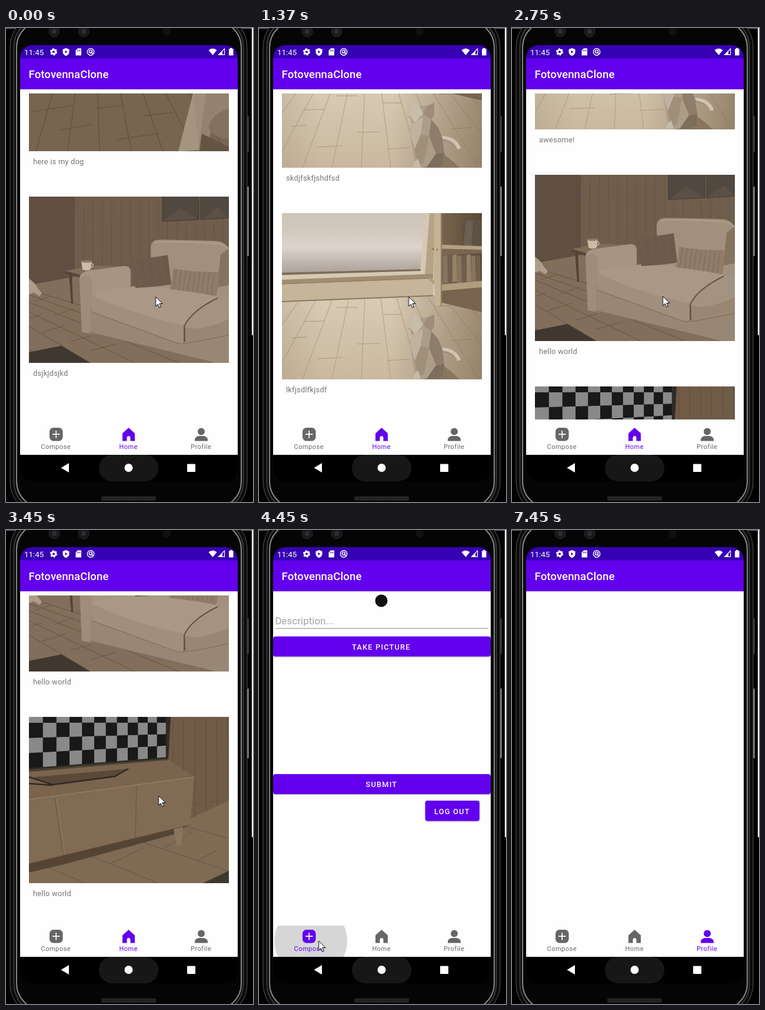
Animation, 420 px wide and 804 px high, one loop 7620 ms. Source, as an HTML page:

```html
<!DOCTYPE html>
<html lang="en">
<head>
<meta charset="utf-8">
<title>Photo feed on a phone</title>
<style>
html, body { margin: 0; width: 100%; height: 100%; overflow: hidden; background: #000; }
body > svg { display: block; width: 420px; height: 804px; }
text { font-family: Roboto, sans-serif; }
.line { fill: none; }
.caption { font-size: 12.8px; letter-spacing: .25px; fill: #757575; }
.title { font-size: 18.6px; font-weight: 500; letter-spacing: .1px; fill: #fff; }
.button { font-size: 12.8px; font-weight: 500; letter-spacing: 1.2px; fill: #fff; }
.label { font-size: 11px; letter-spacing: .5px; }
.tab { color: #666; fill: currentColor; }

#feed, #compose, .tab, .late, .ripple, #cursor { animation: 7620ms step-end infinite; }
#feed { animation-name: feed; }
#compose { animation-name: compose; }
.late { animation-name: late; }
#tabCompose { animation-name: tab-compose; }
#tabHome { animation-name: tab-home; }
#tabProfile { animation-name: tab-profile; }
#rippleA { animation-name: ripple-a; }
#rippleB { animation-name: ripple-b; }
#cursor { animation-name: cursor; }
#list { animation: scroll 7620ms linear infinite; }
.ripple { transform-box: fill-box; transform-origin: center; }

@keyframes feed { 0% { visibility: visible } 58.39%, 100% { visibility: hidden } }
@keyframes compose { 0% { visibility: hidden } 58.39% { visibility: visible } 73.35%, 100% { visibility: hidden } }
@keyframes late { 0% { opacity: 0 } 1.7%, 100% { opacity: 1 } }
@keyframes tab-home { 0% { color: #6200ee } 58.39%, 100% { color: #666 } }
@keyframes tab-compose { 0% { color: #666 } 58.39% { color: #6200ee } 73.35%, 100% { color: #666 } }
@keyframes tab-profile { 0% { color: #666 } 73.35%, 100% { color: #6200ee } }
@keyframes scroll {
  0% { transform: translateY(0) }
  1.7% { transform: translateY(0); animation-timing-function: steps(3, start) }
  7.08% { transform: translateY(-259px) }
  8.92% { transform: translateY(-259px); animation-timing-function: steps(3, start) }
  14.3% { transform: translateY(-518px) }
  16.14% { transform: translateY(-518px); animation-timing-function: steps(2, start) }
  19.75% { transform: translateY(-690px); animation-timing-function: steps(4, start) }
  26.98% { transform: translateY(-989px); animation-timing-function: steps(6, start) }
  37.74% { transform: translateY(-1473px); animation-timing-function: steps(5, start) }
  47.11%, 100% { transform: translateY(-1764px) }
}
@keyframes ripple-a {
  0% { opacity: 0; transform: scale(.45) }
  56.56% { opacity: .1; transform: scale(.6) }
  58.39% { opacity: .16; transform: none }
  60.36% { opacity: .13; transform: scale(1.05) }
  62.2% { opacity: .08; transform: scale(1.08) }
  64.04% { opacity: .03; transform: scale(1.08) }
  66%, 100% { opacity: 0; transform: none }
}
@keyframes ripple-b {
  0% { opacity: 0; transform: scale(.45) }
  71.52% { opacity: .1; transform: scale(.6) }
  73.35% { opacity: .16; transform: none }
  75.19% { opacity: .13; transform: scale(1.05) }
  77.16% { opacity: .06; transform: scale(1.08) }
  79%, 100% { opacity: 0; transform: none }
}
@keyframes cursor {
  0% { transform: translate(254.5px, 456px) }
  19.8% { transform: translate(256.5px, 455px) }
  45.24% { transform: translate(259.5px, 451px) }
  47.2% { transform: translate(246px, 482px) }
  49% { transform: translate(205px, 561px) }
  50.9% { transform: translate(151px, 640px) }
  52.7% { transform: translate(113px, 687px) }
  54.7% { transform: translate(101.5px, 697px) }
  62.2% { transform: translate(157px, 696px) }
  64.04% { transform: translate(268px, 691px) }
  66% { transform: translate(366px, 695px) }
  67.84% { transform: translate(349.5px, 698px) }
  92.12% { transform: translate(357px, 742px) }
  94.09% { transform: translate(372.5px, 802.5px) }
  97.76%, 100% { transform: translate(380px, 830px) }
}
</style>
</head>
<body>
<svg viewBox="0 0 420 804">
  <defs>
    <linearGradient id="glass" x2="0" y2="1">
      <stop stop-color="#cdc3b7"/><stop offset=".3" stop-color="#d2c8be"/>
      <stop offset=".55" stop-color="#ddd4cc"/><stop offset="1" stop-color="#a99e96"/>
    </linearGradient>
    <linearGradient id="pale" x2="0" y2="1">
      <stop offset=".5" stop-color="#d9ccb5"/><stop offset="1" stop-color="#c8b89f"/>
    </linearGradient>
    <linearGradient id="shade">
      <stop stop-color="#6b563e" stop-opacity=".12"/><stop offset=".2" stop-color="#6b563e" stop-opacity="0"/>
      <stop offset=".55" stop-color="#6b563e" stop-opacity="0"/><stop offset="1" stop-color="#6b563e" stop-opacity=".55"/>
    </linearGradient>
    <linearGradient id="shelf">
      <stop stop-color="#7b6750"/><stop offset="1" stop-color="#5a4836"/>
    </linearGradient>
    <linearGradient id="brown" x2="1" y2="0">
      <stop stop-color="#5f4e40"/><stop offset="1" stop-color="#776552"/>
    </linearGradient>
    <pattern id="mesh" width="3" height="3" patternUnits="userSpaceOnUse">
      <path d="M0 0h3v3H0z" fill="#1b1b1b"/><circle cx="1.5" cy="1.5" r=".8" fill="#454545"/>
    </pattern>
    <clipPath id="screen"><rect x="24" y="29" width="370" height="740" rx="21"/></clipPath>
    <clipPath id="feedBox"><path d="M24 111.500H394V664H24z"/></clipPath>
    <clipPath id="tabs"><path d="M24 671H394V724H24z"/></clipPath>

    <symbol id="floor" viewBox="0 0 340 282">
      <path d="M0 0h340v282H0z" fill="#77654f"/>
      <g id="floorPlanks" class="line" stroke="#5d4c3b"/>
      <path d="M0 216l75-12M52 246l58-10M112 210l50-6M150 262l70-10M196 222l48-6" class="line" stroke="#5f4f3e"/>
      <path d="M254 282l25-98 32-2-10 97-40 3z" fill="#a59480"/>
      <path d="M279 170h70v55l-40 16-22 25z" fill="#a08e7a"/>
      <path d="M303 170l-15 108 11 4 14-44 27-20V170z" fill="#94826e"/>
      <path d="M305 240c8-18 16-24 35-30v52c-20-2-28-8-35-22z" fill="#83715f"/>
      <path d="M294 252l46 23v7h-50z" fill="#655442"/>
    </symbol>

    <symbol id="sofa" viewBox="0 0 340 282">
      <path d="M0 0h340v282H0z" fill="url(#brown)"/>
      <path d="M78 0h262v160H78z" fill="#705e4c"/>
      <g id="sofaPanels" class="line" stroke="#5d4c3d" opacity=".55"/>
      <path d="M0 0h78v152l-78-10z" fill="#604f41"/>
      <path d="M0 150l88-16v60l252 88H0z" fill="#826f5b"/>
      <g id="sofaPlanks" class="line" stroke="#66543f"/>
      <path d="M10 178l26-8M44 202l32-12M18 232l44-14M70 246l36-10M104 262l44-12M2 206l18-6" class="line" stroke="#695743"/>
      <path d="M62 126l48-9 64 2-78 16z" fill="#806c57"/><path d="M62 126v5l34 9v-5z" fill="#584738"/>
      <path d="M68 130l4 52 3-1-2-50z" fill="#514236"/>
      <path d="M0 139c7 5 12 10 14 15l8 10-4 5-10-6-8 3z" fill="#ad9c87"/>
      <path d="M0 264l55-11 49 29H0z" fill="#40372f"/>
      <path d="M227 0h62v39l-62 3zM292 0h48v36l-48 3z" fill="#514840"/>
      <path d="M227 42l31-22 31 19zM292 39l29-21 19 18z" fill="#5c5046"/>
      <path d="M227 0v42l62-3V0M292 0v39l48-3" class="line" stroke="#423930"/>
      <path d="M89 109h18l-2 14c-3 3-11 3-14 0z" fill="#cbbba7"/><ellipse cx="98" cy="110" rx="9" ry="2" fill="#8d7a67"/>
      <path d="M105 114c6-2 5 6-1 6" class="line" stroke="#cbbba7" stroke-width="1.500"/>
      <path d="M207 88c0-12 7-15 18-15l88 2c13 0 24 4 27 15v86H209z" fill="#a1907d"/>
      <path d="M214 78c22-3 76-1 108 2 10 2 14 5 18 9" class="line" stroke="#b09f8b" stroke-width="2"/>
      <path d="M326 98l14-10v62l-20 4z" fill="#85735f"/>
      <path d="M86 137c2-8 10-11 19-12l55-7c10-1 13 4 13 10v24l-65 22v57l-18-3z" fill="#a69583"/>
      <path d="M86 138c8-7 18-5 21 3l1 92-18-3z" fill="#9f8d7a"/>
      <path d="M104 188l158 58 78-12v48H316L104 231z" fill="#998775"/>
      <path d="M108 166c2-7 14-9 74-14l116 5c18 1 24 8 24 15l-56 47-3 26c-1 5-8 5-16 2L108 196z" fill="#a08f7c"/>
      <path d="M108 168c2-8 14-11 74-16l116 5c18 1 26 8 22 15l-57 46c-40-8-105-26-155-50z" fill="#a99886"/>
      <path d="M266 219c4-12 24-30 54-46l20-5v70l-56 13c-11 1-18-4-18-12z" fill="#a49380"/>
      <path d="M266 221c14 5 34 4 74-13v30l-56 13c-11 1-18-4-18-12z" fill="#998774"/>
      <path d="M264 247v-27c8-17 26-33 57-48" class="line" stroke="#665542" stroke-width="2"/>
      <path d="M103 230l213 52M108 196l140 51c10 4 24 2 92-12" class="line" stroke="#7b6955"/>
      <path d="M172 106c22-1 42-3 64-7 2 16 4 33 6 50-20 3-42 5-61 6-3-17-5-33-9-49z" fill="#6c5b4b"/>
      <path d="M180 110l10 40m6-42l8 42m8-44l6 42m4-44l8 42" class="line" stroke="#746352"/>
      <path d="M245 122c26 5 52 6 79 6-2 14-3 27-5 41-27-5-53-9-80-12 4-12 5-23 6-35z" fill="#8f7d69"/>
      <g id="cushion" class="line" stroke="#7d6b58"/>
    </symbol>

    <symbol id="cat" viewBox="0 0 340 282">
      <path d="M0 0h340v282H0z" fill="url(#pale)"/>
      <g id="catPlanks" class="line" stroke="#b09e84"/>
      <path d="M38 184l34-1M92 160h37M128 222l39-1M60 247l42-2M171 172h33M178 250l40-2M16 212l26-2M213 196h20M288 216l34-2M258 158l28-1" class="line" stroke="#ad9b81"/>
      <path d="M0 140h340v142H0z" fill="url(#shade)"/>
      <path d="M0 0h248l-11 98-237 6z" fill="url(#glass)"/>
      <path d="M244 0h17l-4 112-257 11v-16l235-9z" fill="#d6c9b2"/>
      <path d="M251 0h10l-4 106h-14z" fill="#b6a387"/>
      <path d="M0 101l236-6v3L0 105z" fill="#7c6d5b"/>
      <path d="M0 113l257-10v9L0 121z" fill="#a08d72"/>
      <path d="M0 121l257-10v30L0 149z" fill="#c5b59a"/>
      <path d="M0 120l257-10" class="line" stroke="#8f7c62"/><path d="M0 150l257-10" class="line" stroke="#897860" stroke-width="2"/>
      <path d="M266 0h74v140l-70 2z" fill="url(#shelf)"/>
      <path d="M306 18l7-5 27-3v48l-32 2z" fill="#5d5143"/><path d="M313 13l12-1-3 47-14 1z" fill="#6c6052"/>
      <g id="books"/>
      <path d="M252 53l88 3v8l-72 3-16-13z" fill="#b3a184"/><path d="M254 60l86 2v6l-71 3z" fill="#7a6650"/>
      <path d="M250 108l20 13 70-6v11l-70 6-20-19z" fill="#b09d7f"/>
      <path d="M259 0h13l-1 157-10 1-3-52z" fill="#c3b294"/><path d="M271 0v157" class="line" stroke="#917e64" stroke-width="2"/>
      <path d="M272 132l68-6v42l-68-16z" fill="#78644e"/>
      <circle cx="264" cy="62" r="1.500" fill="#867459"/>
      <path d="M264 250l30 24 8 8h-62z" fill="#89765f"/>
      <path d="M266 231c13 0 22 2 27 7 4 3 7 7 8 12" class="line" stroke="#cfc3b1" stroke-width="6"/>
      <path d="M266 234c11 0 20 2 26 9" class="line" stroke="#9a8a77" stroke-width="2"/>
      <path d="M223 168l11 9h13l12-5v20l-5 8 12 14 7 18 3 24-1 20-8 5h-46l5-10-4-22-4-24 3-18-4-14 3-12z" fill="#ac9d89"/>
      <path d="M220 181l3-13 11 9 6 13-14 16-9-13z" fill="#c8bcaa"/>
      <path d="M247 177l12-5v20l-5 8-14-10z" fill="#9d8d79"/>
      <path d="M221 207l19-11-4 30-10 24-8-25z" fill="#bfb2a0"/>
      <path d="M254 200l12 14 7 18 3 24-14 2-12-30z" fill="#8d7d6a"/>
      <path d="M262 258l14-2-1 20-8 5h-21z" fill="#7d6d5b"/>
      <path d="M236 226l14 2-8 44-10 8-6-30z" fill="#a09079"/>
      <path d="M221 281l5-10 6-4 4 14z" fill="#c5b9a7"/>
    </symbol>

    <symbol id="tv" viewBox="0 0 340 282">
      <path d="M0 0h340v282H0z" fill="#6e5a46"/>
      <path d="M238 0h102v180H238z" fill="#705b47"/>
      <g id="tvPanels" class="line" stroke="#624f3d"/>
      <path d="M0 236l280-66 60-28v140H0z" fill="#7f6a54"/>
      <path d="M276 150l64-10M268 186l72 20M180 208l160 54M90 230l130 52M20 250l76 32M230 222l46-26M140 248l56-26M286 244l34-18" class="line" stroke="#67543f"/>
      <path d="M0 92l237-20 44 30-10 12L0 150z" fill="#7a644e"/>
      <path d="M0 249l274-67-30 18L60 250 0 264z" fill="#544434"/>
      <path d="M246 190l16-5-2 33h-9z" fill="#8a745d"/>
      <path d="M0 140l281-38-7 81L0 249z" fill="#826b54"/>
      <path d="M0 140l281-38" class="line" stroke="#947c64" stroke-width="1.500"/>
      <path d="M0 249l274-66M44 138l14 95M183 117l-2 88" class="line" stroke="#66533f"/>
      <path d="M47 137l14 95" class="line" stroke="#917a62"/>
      <path d="M0 100l40 15 106-14 23-13L0 103z" fill="#5a4937"/>
      <path d="M0 0h241l-4 73L0 93z" fill="#302c25"/>
      <g id="checker"/>
      <path d="M0 91l237-19" class="line" stroke="#514838" stroke-width="2"/>
      <path d="M0 102l40 13 106-14 23-13M0 113l40 3" class="line" stroke="#2f2a23" stroke-width="2.500"/>
      <path d="M296 282l44-21v21z" fill="#40372e"/>
    </symbol>
  </defs>

  <!-- handset -->
  <g class="line">
    <path d="M0 .5h420" stroke="#777"/>
    <rect x="7" y="-24" width="403" height="850" rx="56" fill="#0b0b0b" stroke="#575757"/>
    <rect x="13.500" y="-18" width="390" height="838" rx="50" stroke="#3a3a3a" stroke-width="2"/>
    <rect x="18" y="-12" width="382" height="826" rx="45" fill="#050505" stroke="#858585" stroke-width="2"/>
  </g>
  <path d="M410 150h3v60h-3z" fill="#3a3a3a"/>
  <path d="M410 269h3v118h-3z" fill="#777"/>
  <path d="M418 0h2v521h-2z" fill="#fff"/>
  <g fill="#17181b" stroke="#292a2d">
    <circle cx="82" cy="6" r="9"/><circle cx="132" cy="6" r="9"/>
    <circle cx="82" cy="6" r="4" fill="#2b2d33"/><circle cx="132" cy="6" r="4" fill="#2b2d33"/>
    <circle cx="273" cy="6" r="6.500" fill="#101010" stroke="#151515"/>
  </g>
  <rect x="162" y="794" width="93" height="8" rx="3" fill="url(#mesh)"/>

  <g clip-path="url(#screen)">
    <path d="M24 29h370v740H24z" fill="#000"/>
    <path d="M24 104h370v620H24z" fill="#fefefe"/>
    <path d="M24 29h370v23H24z" fill="#3700b3"/>
    <path d="M24 51.500h370V104H24z" fill="#6200ee"/>
    <text x="31" y="45.500" font-size="13.400" fill="#fff">11:45</text>
    <text x="38.500" y="85" class="title">FotovennaClone</text>

    <g fill="#fff">
      <circle cx="81" cy="40.500" r="3.500" class="line" stroke="#fff" stroke-width="3"/>
      <circle cx="81" cy="40.500" r="5.200" class="line" stroke="#fff" stroke-width="2" stroke-dasharray="2.700 2.750"/>
      <path d="M102 34l5.500 2.300v4c0 3.500-2.500 6-5.500 7-3-1-5.500-3.500-5.500-7v-4z"/>
      <path d="M100.500 38l4 2.500-4 2.500z" fill="#3700b3"/>
      <path d="M122 34.500h6v12h-9.500V38z"/><path d="M121.500 37v2.500m2.200-2.500v2.500m2.200-2.500v2.500" stroke="#3700b3"/>
      <circle cx="144" cy="40.500" r="5.700" class="line" stroke="#fff" stroke-width="1.400"/>
      <circle cx="144" cy="40" r="2.600" class="line" stroke="#fff" stroke-width="1.400"/>
      <path d="M144 40l4 4" stroke="#fff" stroke-width="1.500"/>
      <path d="M344.500 37.500q7-5.500 14 0l-7 8.500z"/>
      <path d="M361.500 45.300h10v-10z" class="line" stroke="#fff" stroke-width="1.200"/><path d="M361 46l7-7v7z"/>
      <path d="M379 35.500h2v-1.500h3.500v1.500h2V46.500H379z"/>
    </g>

    <g id="feed" clip-path="url(#feedBox)"><g id="list"></g></g>

    <g id="compose">
      <circle cx="208" cy="120" r="10.500" fill="#111"/>
      <text x="27.500" y="160" font-size="16.800" letter-spacing=".1" fill="#a2a2a2">Description...</text>
      <path d="M28 167h362" stroke="#858585"/>
      <g fill="#999" opacity=".55"><rect x="24" y="182" width="370" height="34" rx="4"/><rect x="24" y="415.500" width="370" height="34" rx="4"/><rect x="283" y="461" width="92" height="34" rx="4"/></g>
      <g fill="#6200ee"><rect x="24" y="180.500" width="370" height="34" rx="4"/><rect x="24" y="414" width="370" height="34" rx="4"/><rect x="282.500" y="459" width="92.500" height="34.500" rx="4"/></g>
      <text x="158" y="202.500" class="button">TAKE PICTURE</text>
      <text x="181.500" y="436" class="button">SUBMIT</text>
      <text x="298" y="481.500" class="button">LOG OUT</text>
    </g>

    <g clip-path="url(#tabs)">
      <circle id="rippleA" class="ripple" cx="88" cy="697" r="62"/>
      <circle id="rippleB" class="ripple" cx="333" cy="697" r="62"/>
    </g>
    <g id="tabCompose" class="tab">
      <rect x="74" y="678" width="22.500" height="22.500" rx="6.500"/>
      <path d="M79 689.200h12.500M85.200 683v12.500" stroke="#fff" stroke-width="1.700"/>
      <text x="59.500" y="714" class="label">Compose</text>
    </g>
    <g id="tabHome" class="tab">
      <path d="M208.500 678l10.500 9.500v13h-7.500v-5.500c0-4-6-4-6 0v5.500h-7.500v-13z"/>
      <text x="192.500" y="714" class="label">Home</text>
    </g>
    <g id="tabProfile" class="tab">
      <circle cx="332" cy="684.500" r="6"/>
      <path d="M321 700.500v-2c0-4 4-6.500 8-6.500h6c4 0 8 2.500 8 6.500v2z"/>
      <text x="314" y="714" class="label">Profile</text>
    </g>

    <rect x="158" y="724" width="101" height="45" rx="22" fill="#171717"/>
    <g fill="#fff">
      <path d="M93.500 746l13.500-8v16z"/><circle cx="208.500" cy="746" r="7"/><rect x="308" y="739.500" width="14" height="13.500" rx="1"/>
    </g>
  </g>

  <g id="cursor"><path d="M0 0v16l3.700-3.500 2.600 5.800 2.600-1.200-2.500-5.600h5.200z" fill="#fff" stroke="#000"/></g>
</svg>
<script>
const fill = (id, html) => { document.getElementById(id).innerHTML = html; };
const count = (n, make) => Array.from({ length: n }, (_, i) => make(i)).join('');

// Lines through a vanishing point (vx, vy), cut to the band y0..y1.
function fan(id, vx, vy, y0, y1, first, gap, n) {
  const at = (x, y) => vx + (x - vx) * (y - vy) / (y1 - vy);
  fill(id, count(n, i => {
    const x = first + i * gap;
    return `<path d="M${at(x, y0)} ${y0}L${x} ${y1}"/>`;
  }));
}

fan('floorPlanks', 110, -60, 150, 282, -150, 54, 11);
fan('sofaPanels', 200, -9000, 0, 160, 12, 16, 21);
fan('sofaPlanks', -220, 90, 150, 282, -120, 75, 8);
fan('catPlanks', 148, -20, 144, 282, -215, 50, 15);
fan('tvPanels', 290, -9000, 0, 170, 244, 19, 6);

fill('cushion', count(9, i => `<path d="M${251 + i * 8} ${124 + i * .7}l-5 ${33 + i * .4}"/>`));
fill('books', count(8, i => {
  const shade = ['#86745e', '#6f5f4d', '#938169'][i % 3];
  return `<path d="M${274 + i * 8} ${73 - i % 3}l7-1 1 46-8 1z" fill="${shade}"/>`;
}));

// Perspective chequerboard: columns narrow and rows flatten to the right.
const colX = i => 24.2 * i - .4 * i * i;
const rowY = (r, x) => 87 - 25.7 * r - (19 - 6.3 * r) * x / 236;
fill('checker', count(48, k => {
  const c = k % 12, r = Math.floor(k / 12);
  const pt = (i, j) => `${colX(i)} ${rowY(j, colX(i))}`;
  const tone = (c + r) % 2 ? '#898989' : '#191919';
  return `<path d="M${pt(c, r)}L${pt(c + 1, r)}L${pt(c + 1, r + 1)}L${pt(c, r + 1)}z" fill="${tone}"/>`;
}));

const posts = [
  ['floor', 'here is my dog'], ['sofa', 'dsjkjdsjkd'], ['cat', 'skdjfskfjshdfsd'],
  ['cat', 'lkfjsdlfkjsdf'], ['cat', 'awesome!'], ['sofa', 'hello world'], ['tv', 'hello world']
];
fill('list', posts.map(([photo, caption], i) => {
  const y = 359 * i - 73;
  return `<g class="${i === 2 ? 'late' : ''}">
    <use href="#${photo}" x="39" y="${y}" width="340" height="282"/>
    <text x="46" y="${y + 304}" class="caption">${caption}</text></g>`;
}).join(''));
</script>
</body>
</html>
```
